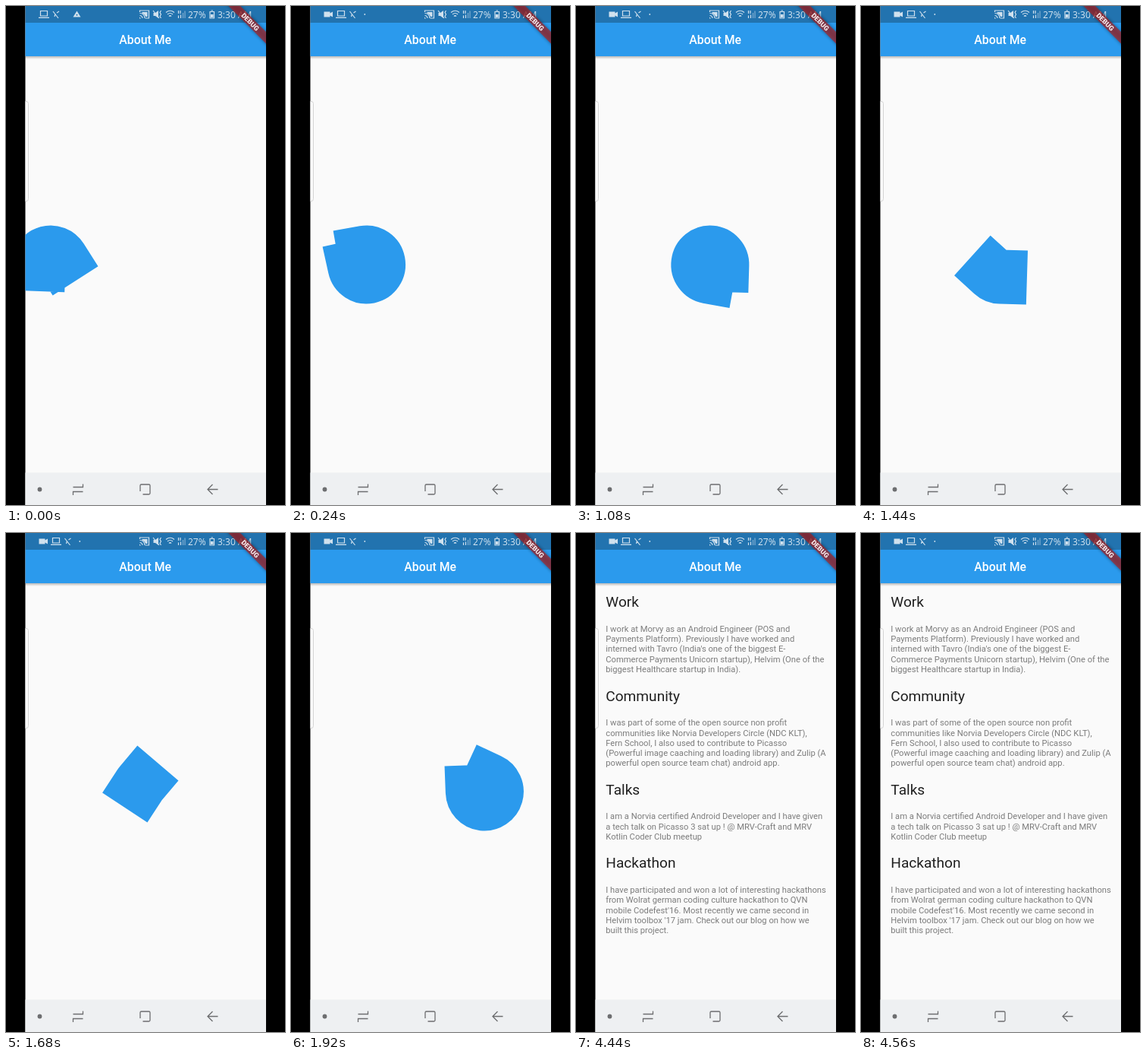
Animation, 368 px wide and 656 px high, one loop 4680 ms. Source, as an HTML page:

```html
<!DOCTYPE html>
<html lang="en">
<head>
<meta charset="utf-8">
<title>About Me</title>
<style>
  html, body { margin: 0; width: 100%; height: 100%; overflow: hidden; background: #000; }
  svg { display: block; width: 368px; height: 656px; }
  text { font-family: Roboto, sans-serif; }
  .title { font-size: 15.8px; font-weight: 500; fill: #fff; }
  .head { font-size: 19.1px; fill: #202020; }
  .body { font-size: 11.2px; fill: #7c7c7c; }
  .clock { font: 12px "Open Sans", sans-serif; fill: #d5e5f1; }
  .debug { font-size: 9px; font-weight: 900; fill: #f6e9ec; }
  .line { fill: none; stroke: #d0e1ee; stroke-width: 1.2; }
  .solid { fill: #d0e1ee; }
  .nav { fill: none; stroke: #6d6e70; stroke-width: 1.3; }
</style>
</head>
<body>
<svg viewBox="0 0 368 656">
  <defs>
    <clipPath id="screen"><rect x="25.5" width="317.5" height="656"/></clipPath>
    <linearGradient id="shade" x2="0" y2="1">
      <stop stop-color="#000" stop-opacity=".26"/>
      <stop offset="1" stop-color="#000" stop-opacity="0"/>
    </linearGradient>
    <filter id="soft" x="-20%" y="-80%" width="140%" height="260%"><feGaussianBlur stdDeviation="2"/></filter>
    <g id="laptop" class="line"><path d="M2.5 .5h9v6.5h-9zM0 9.4h14"/></g>
    <g id="key" class="line"><path d="M0 1l7 9M3 4.5L2 8M5 3l3-2"/></g>
  </defs>
  <rect width="368" height="656"/>
  <g clip-path="url(#screen)">
    <rect x="25" width="318" height="656" fill="#fafafa"/>
    <path d="M25 125.500h2q2.500 0 2.500 3v125q0 3-2.500 3h-2" fill="#fcfcfc" stroke="#d4d4d4"/>
    <path id="spinner" fill="none" stroke="#2b9aed" stroke-width="71" stroke-linecap="square"/>
    <g id="article"></g>

    <rect x="25" y="66" width="318" height="4" fill="url(#shade)"/>
    <rect x="25" y="22" width="318" height="44" fill="#2b9aed"/>
    <rect x="25" width="318" height="22" fill="#2273af"/>
    <text class="title" x="149.300" y="49.500">About Me</text>

    <g id="iconsA">
      <use href="#laptop" x="43" y="6"/>
      <use href="#key" x="62" y="6"/>
      <path class="solid" d="M93.500 6.500l5 8h-10z"/>
      <circle cx="93.500" cy="11.800" r="1" fill="#2273af"/>
    </g>
    <g id="iconsB">
      <path class="solid" d="M43.500 7.500h8v2l3.500-2v7l-3.500-2v2h-8z"/>
      <use href="#laptop" x="59" y="6"/>
      <use href="#key" x="77.500" y="6"/>
      <circle class="solid" cx="97.300" cy="11" r=".9"/>
    </g>

    <path class="line" d="M176.500 8v-2h12v10h-5M176.500 9.500q6 0 6.500 6.500M176.500 12.500q3 0 3.500 3.500"/>
    <path class="solid" d="M179.500 8h7v6h-2.500q-1-3.500-4.500-4.500zM176 14.500l2 2h-2z"/>
    <path class="solid" d="M194.500 9h2.500l4-3v10l-4-3h-2.500z"/>
    <path class="line" d="M194 6l8 10M204.500 6l-1.500 2.500 1.500 2.500-1.500 2.500 1.500 2.500"/>
    <path class="line" d="M211 8.500q5.500-4.500 11 0M213 11q3.500-3 7 0M215 13.500q1.500-1.500 3 0"/>
    <path id="traffic" class="solid" d="M218 12.500h3l-1.500 3z"/>
    <path class="line" d="M227.500 6v4M230 6v4M227.500 12.500v3.500M230.500 11.500v4.500"/>
    <path class="line" d="M233.500 9v7M236 6.500v9.500" opacity=".55"/>
    <text class="clock" x="240" y="15.500">27%</text>
    <path class="line" d="M269 7.500h5.500v8.500h-5.500zM270.500 6h2.500"/>
    <path class="solid" d="M270 11h3.500v4h-3.500z"/>
    <text class="clock" x="279" y="15.500">3:30 AM</text>

    <g transform="translate(343 0) rotate(45)">
      <rect x="-50" y="24" width="100" height="11" fill="#000" opacity=".4" filter="url(#soft)"/>
      <rect x="-50" y="24" width="100" height="11" fill="#b71c1c" fill-opacity=".63"/>
      <text class="debug" y="32.700" text-anchor="middle">DEBUG</text>
    </g>

    <rect x="25" y="613.500" width="318" height="43" fill="#eef0f2"/>
    <circle cx="44.500" cy="635.500" r="2.900" fill="#6d6e70"/>
    <path class="nav" d="M88.500 632.500h13v-4M101.500 638.500h-13v4.500"/>
    <path class="nav" d="M177 638v-7.500q0-1.500 1.500-1.500h10q1.500 0 1.500 1.500v10q0 1.500-1.500 1.500h-8"/>
    <path class="nav" d="M279.500 635.500h-13M272.500 629l-6.500 6.500 6.500 6.500"/>
  </g>
</svg>
<script>
const LOOP = 4680, STEP = 120, GONE = 2160, TEXT_AT = 4440;
const byId = id => document.getElementById(id);

const sections = [
  [97, "Work", [
    "I work at Morvy as an Android Engineer (POS and",
    "Payments Platform). Previously I have worked and",
    "interned with Tavro (India's one of the biggest E-",
    "Commerce Payments Unicorn startup), Helvim (One of the",
    "biggest Healthcare startup in India)."]],
  [220.5, "Community", [
    "I was part of some of the open source non profit",
    "communities like Norvia Developers Circle (NDC KLT),",
    "Fern School, I also used to contribute to Picasso",
    "(Powerful image caaching and loading library) and Zulip (A",
    "powerful open source team chat) android app."]],
  [343.5, "Talks", [
    "I am a Norvia certified Android Developer and I have given",
    "a tech talk on Picasso 3 sat up ! @ MRV-Craft and MRV",
    "Kotlin Coder Club meetup"]],
  [440.3, "Hackathon", [
    "I have participated and won a lot of interesting hackathons",
    "from Wolrat german coding culture hackathon to QVN",
    "mobile Codefest'16. Most recently we came second in",
    "Helvim toolbox '17 jam. Check out our blog on how we",
    "built this project."]]
];

function addText(cls, y, content) {
  const el = document.createElementNS("http://www.w3.org/2000/svg", "text");
  el.setAttribute("class", cls);
  el.setAttribute("x", 39.3);
  el.setAttribute("y", y);
  el.textContent = content;
  byId("article").append(el);
}
for (const [y, head, lines] of sections) {
  addText("head", y, head);
  lines.forEach((line, i) => addText("body", y + 32.8 + i * 13.25, line));
}

// cubic-bezier(.4, 0, .2, 1), solved by bisection
function ease(x) {
  if (x <= 0 || x >= 1) return Math.min(1, Math.max(0, x));
  let lo = 0, hi = 1, s;
  for (let i = 0; i < 24; i++) {
    s = (lo + hi) / 2;
    const v = 1 - s;
    if (1.2 * v * v * s + 0.6 * v * s * s + s ** 3 < x) lo = s; else hi = s;
  }
  return s * s * (3 - 2 * s);
}

// time in ms, turns of the spinner
const turns = [[0, 1.183], [600, 1.82], [1080, 2.387], [1680, 3.05], [2160, 3.583]];
function turnAt(t) {
  const i = Math.max(1, turns.findIndex(k => k[0] >= t));
  const [t0, a] = turns[i - 1], [t1, b] = turns[i];
  return a + (b - a) * (t - t0) / (t1 - t0);
}

const slideAt = t => t < 1500
  ? 184 - 125 * (1 - t / 1500) ** 2.25
  : 184 + 26 * ((t - 1500) / 300) ** 3;

function arc(cx, cy, r, start, sweep) {
  const point = deg => {
    const a = deg * Math.PI / 180;
    return `${(cx + r * Math.cos(a)).toFixed(3)} ${(cy + r * Math.sin(a)).toFixed(3)}`;
  };
  return `M${point(start)}A${r} ${r} 0 ${+(sweep > 180)} 1 ${point(start + sweep)}`;
}

function spinnerPath(t) {
  const turn = turnAt(t), lap = Math.floor(turn), p = turn - lap;
  const head = 270 * ease(p * 2), tail = 270 * ease(p * 2 - 1);
  const start = -90 + tail + 306 * p - 144 * lap;
  return arc(slideAt(t), 340, 16, start, Math.max(head - tail, 0.5));
}

const show = (id, on) => { byId(id).style.display = on ? "" : "none"; };

function draw(now) {
  const t = Math.floor(now % LOOP / STEP) * STEP;
  show("iconsA", t < STEP);
  show("iconsB", t >= STEP);
  show("traffic", t >= 2640 && t < TEXT_AT);
  show("article", t >= TEXT_AT);
  show("spinner", t < GONE);
  if (t < GONE) byId("spinner").setAttribute("d", spinnerPath(t));
}

const begin = performance.now();
function tick() {
  draw(performance.now() - begin);
  requestAnimationFrame(tick);
}
tick();
</script>
</body>
</html>
```
